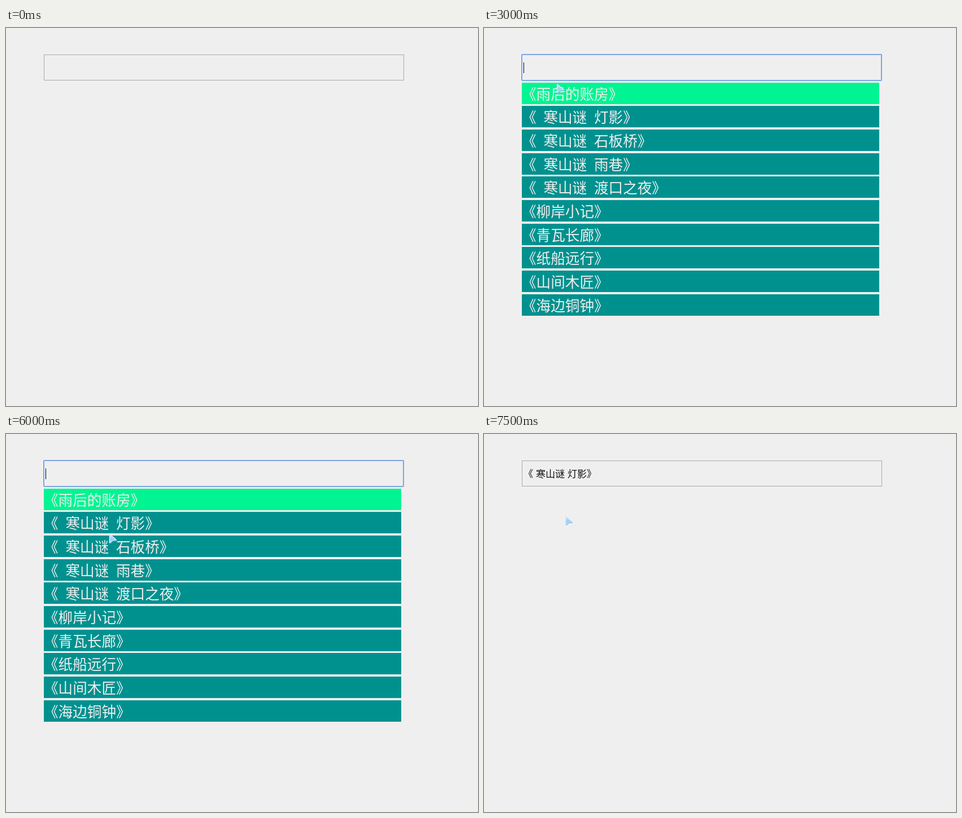
Recreate the animation shown at these times as an HTML page. Size 836 px wide and 670 px high, loop 8000 ms.

```html
<!DOCTYPE html>
<html lang="zh-CN">
<head>
<meta charset="utf-8">
<title>书名选择框</title>
<style>
  html, body { margin: 0; width: 100%; height: 100%; overflow: hidden; background: #efefef; }
  body {
    position: relative;
    font-family: "Noto Sans CJK SC", "Noto Sans CJK", sans-serif;
    text-spacing-trim: space-all;
    white-space: pre;
  }
  .box, .open, .focus, .caret, .value, .row, .pointer { position: absolute; box-sizing: border-box; }
  .box { left: 67px; top: 47px; width: 638px; height: 46px; border: 1px solid #a9a9a9; }
  .open { inset: 0; animation: open 8s step-end infinite; }
  .focus {
    left: 66px; top: 46px; width: 639px; height: 48px;
    border: 2px solid #7ea4e2; border-radius: 2px; background: #efefef;
  }
  .caret { left: 70px; top: 61px; width: 1px; height: 19px; background: #000; animation: blink 1s step-end infinite; }
  .value {
    left: 70px; top: 58px; line-height: 24px; font-size: 17.07px; word-spacing: .06em;
    color: #111; animation: value 8s step-end infinite;
  }
  .row {
    left: 67px; top: calc(96.8px + var(--i) * 41.67px); width: 633px; height: 38px;
    line-height: 38px; font-size: 25.6px; font-weight: 300; word-spacing: .276em;
    color: #efefef; background: #00918f;
  }
  .first { animation: first 8s step-end infinite; }
  .second { animation: second 8s step-end infinite; }
  .pointer { left: 0; top: 0; width: 15px; height: 18px; animation: pointer 8s step-end infinite; }

  @keyframes open {
    0% { visibility: hidden; }
    25% { visibility: visible; }
    87.5%, 100% { visibility: hidden; }
  }
  @keyframes blink { 0% { opacity: 1; } 50%, 100% { opacity: 0; } }
  @keyframes value { 0% { opacity: 0; } 87.5%, 100% { opacity: 1; } }
  @keyframes first { 0% { background: #00918f; } 31.25%, 100% { background: #00f592; } }
  @keyframes second { 0% { background: #00918f; } 81.25%, 100% { background: #00f592; } }
  @keyframes pointer {
    0% { opacity: 0; transform: translate(116px, 73px); }
    6.25% { opacity: 1; transform: translate(116px, 73px); }
    25% { opacity: 1; transform: translate(128px, 98px); }
    75% { opacity: 1; transform: translate(182px, 176px); }
    81.25% { opacity: 1; transform: translate(175px, 166px); }
    93.75%, 100% { opacity: 1; transform: translate(143px, 144px); }
  }
</style>
</head>
<body>
<div class="box"></div>
<div class="value">《 寒山谜 灯影》</div>
<div class="open">
  <div class="focus"></div>
  <div class="caret"></div>
  <div class="row first" style="--i:0">《雨后的账房》</div>
  <div class="row second" style="--i:1">《 寒山谜 灯影》</div>
  <div class="row" style="--i:2">《 寒山谜 石板桥》</div>
  <div class="row" style="--i:3">《 寒山谜 雨巷》</div>
  <div class="row" style="--i:4">《 寒山谜 渡口之夜》</div>
  <div class="row" style="--i:5">《柳岸小记》</div>
  <div class="row" style="--i:6">《青瓦长廊》</div>
  <div class="row" style="--i:7">《纸船远行》</div>
  <div class="row" style="--i:8">《山间木匠》</div>
  <div class="row" style="--i:9">《海边铜钟》</div>
</div>
<svg class="pointer" viewBox="0 0 15 18">
  <defs>
    <linearGradient id="ice" x1="0" y1="0" x2="0" y2="1">
      <stop offset="0" stop-color="#c4e2f4"/>
      <stop offset="1" stop-color="#86c0ea"/>
    </linearGradient>
  </defs>
  <path d="M1 0 L14.5 11.5 L13 13.5 L7.5 14 L3 18 L0.5 17 Z" fill="#d3eaf6"/>
  <path d="M2.5 17.2 L7.3 13.4 L13.6 12.8" fill="none" stroke="#62b4e8" stroke-width="1.4"/>
  <path d="M2.5 3.5 L11.3 11 L6.3 11.8 L2.5 14.8 Z" fill="url(#ice)"/>
</svg>
</body>
</html>
```
